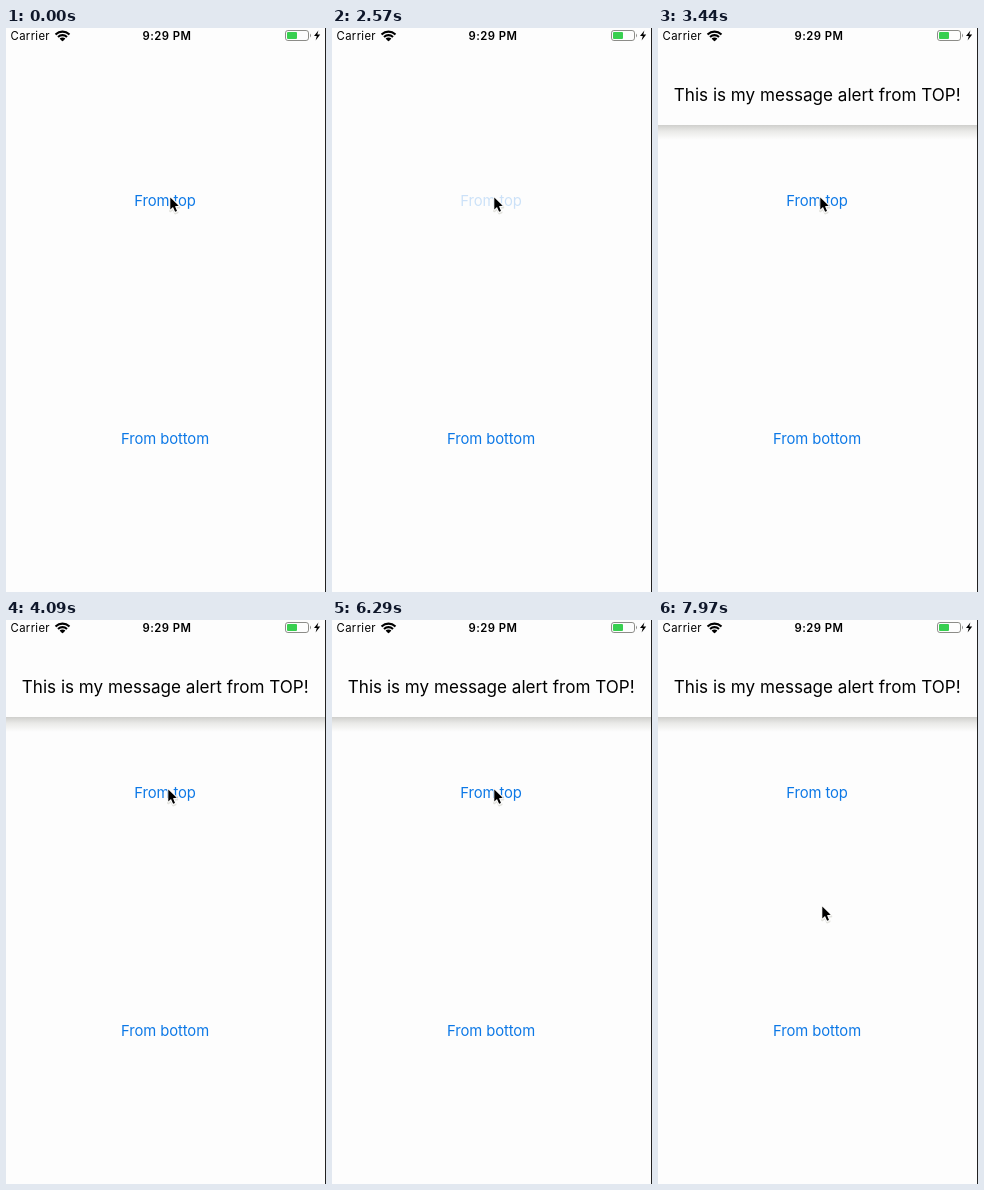
These frames come from a looping animation (320 px wide and 564 px high, 7990 ms). An HTML page:

```html
<!DOCTYPE html>
<html lang="en">
<head>
<meta charset="utf-8">
<title>Message alert</title>
<style>
  html, body { margin: 0; width: 100%; height: 100%; overflow: hidden; background: #fdfdfd; }
  svg { display: block; width: 100vw; height: 100vh; }
  text { font-family: Inter, Roboto, sans-serif; fill: #000; }
  .button { font-size: 14.8px; letter-spacing: -.08px; text-anchor: middle; fill: #0c78e6; }
  .message { font-size: 17.1px; text-anchor: middle; }
  .status { font-size: 11.3px; letter-spacing: .34px; }
  .clock { font-weight: 600; letter-spacing: .45px; text-anchor: middle; }
</style>
</head>
<body>
<svg viewBox="0 0 320 564">
  <defs>
    <linearGradient id="shade" x1="0" y1="0" x2="0" y2="1">
      <stop offset="0" stop-color="#505048" stop-opacity=".27"/>
      <stop offset=".4" stop-color="#606050" stop-opacity=".13"/>
      <stop offset="1" stop-color="#707060" stop-opacity="0"/>
    </linearGradient>
    <clipPath id="fan"><path d="M56.5 13 L46.5 3 V0 H66.5 V3 Z"/></clipPath>
  </defs>

  <rect width="320" height="564" fill="#fdfdfd"/>
  <text id="topButton" class="button" x="159" y="177.8">From top</text>
  <text class="button" x="159" y="415.8">From bottom</text>

  <g id="alert">
    <rect y="97" width="320" height="15" fill="url(#shade)"/>
    <rect width="320" height="97" fill="#fdfdfd"/>
    <text class="message" x="159.2" y="72.6">This is my message alert from TOP!</text>
  </g>

  <g id="statusBar">
    <text class="status" x="4.6" y="11.5">Carrier</text>
    <g clip-path="url(#fan)" transform="translate(0 .4)" fill="none" stroke="#000" stroke-width="2.1">
      <circle cx="56.5" cy="12.6" r="9.4"/>
      <circle cx="56.5" cy="12.6" r="5.9"/>
      <circle cx="56.5" cy="12.6" r="1.7" stroke-width="3.4"/>
    </g>
    <text class="status clock" x="160.9" y="11.5">9:29 PM</text>
    <rect x="279.5" y="2.5" width="23" height="10" rx="2.4" fill="none" stroke="#8c8c88"/>
    <rect x="281" y="4" width="10" height="7" rx="1" fill="#38cf50"/>
    <path d="M304 5.5 Q306 7.5 304 9.5 Z" fill="#8c8c88"/>
    <path d="M312.4 2.4 L308 8 H310.8 L309.6 12.4 L314.2 6.5 H311.3 Z"/>
  </g>

  <rect x="319" width="1" height="564" fill="#222"/>

  <g id="cursor">
    <path d="M.8 1 V14 L3.6 11.4 L5.8 16.2 L7.8 15.3 L5.7 10.7 L9.6 10.4 Z"
          fill="#5c5c40" opacity=".16" stroke="#5c5c40" stroke-width="2.4" stroke-linejoin="round"/>
    <path d="M.8 .4 V12.4 L3.5 10 L5.6 14.8 L7.5 14 L5.5 9.2 L9.2 8.8 Z"
          fill="#000" stroke="#fff" stroke-width="2" stroke-linejoin="round" paint-order="stroke"/>
  </g>
</svg>
<script>
  const LOOP = 7990;
  const $ = id => document.getElementById(id);
  const topButton = $('topButton'), alertBox = $('alert'), cursor = $('cursor');

  // Linear interpolation through [time, value] points.
  function track(points, t) {
    if (t <= points[0][0]) return points[0][1];
    for (let i = 1; i < points.length; i++) {
      const [t0, a] = points[i - 1], [t1, b] = points[i];
      if (t < t1) return a + (b - a) * (t - t0) / (t1 - t0);
    }
    return points[points.length - 1][1];
  }

  const cursorX = [[860, 163.5], [1560, 161.5], [7300, 161.5], [7970, 163.5]];
  const cursorY = [[6850, 169], [7130, 197], [7970, 286]];
  const press = [[2550, 1], [2551, .2], [2720, .2], [2930, 1]];
  const slide = [[2780, -112], [2940, -55], [3159, -55], [3160, -5], [3239, -5], [3240, 0]];

  function draw(t) {
    const x = track(cursorX, t), y = Math.round(track(cursorY, t));
    cursor.setAttribute('transform', `translate(${x} ${y})`);
    topButton.setAttribute('opacity', track(press, t));
    alertBox.setAttribute('transform', `translate(0 ${track(slide, t)})`);
  }

  const start = performance.now();
  function tick() {
    draw((performance.now() - start) % LOOP);
    requestAnimationFrame(tick);
  }
  draw(0);
  requestAnimationFrame(tick);
</script>
</body>
</html>
```
